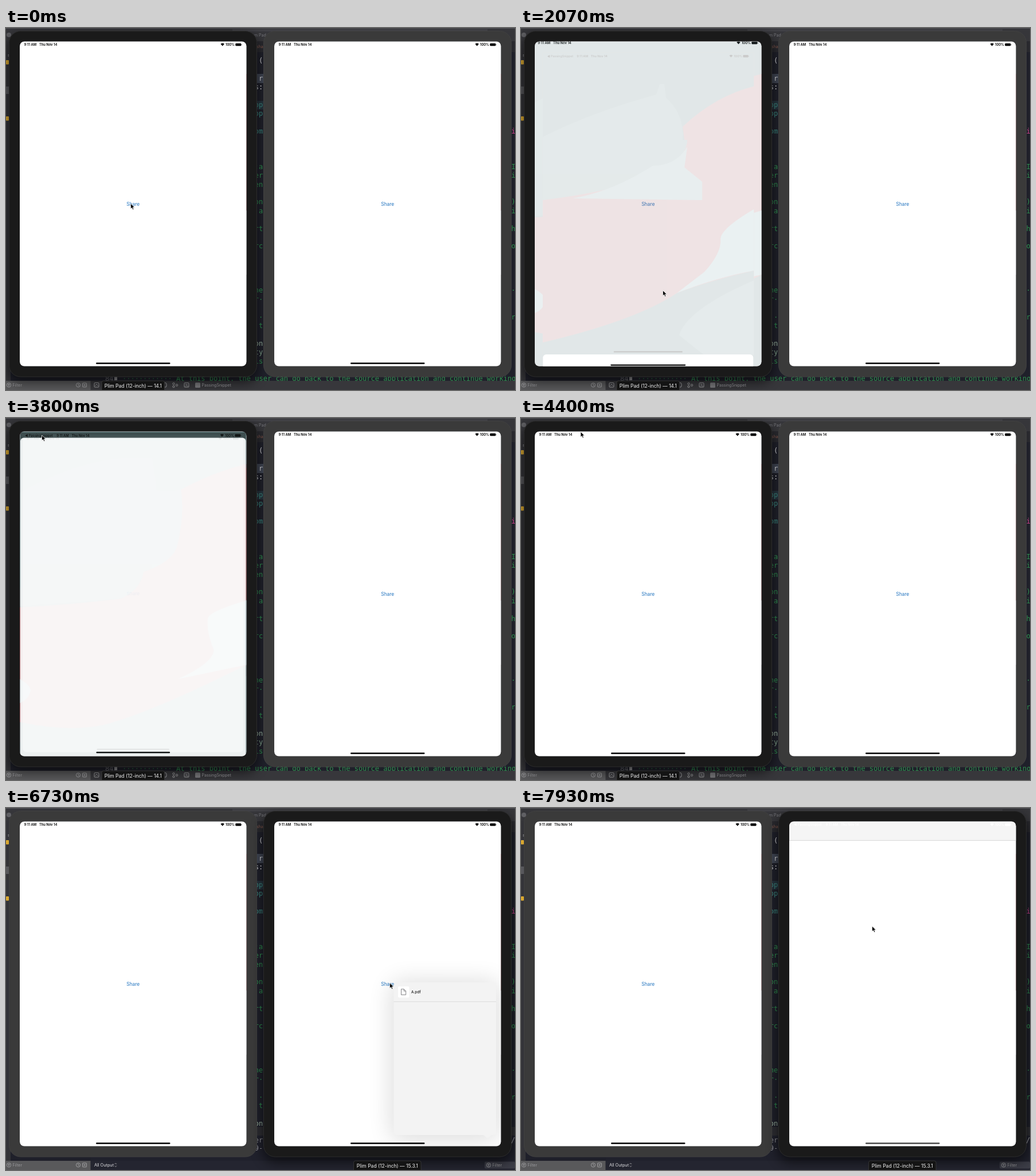
Recreate the animation shown at these times as an HTML page. Size 888 by 631 pixels, loop 8 s.

```html
<!DOCTYPE html>
<html lang="en">
<head>
<meta charset="utf-8">
<title>Sharing between two tablets</title>
<style>
html, body { margin: 0; width: 100%; height: 100%; overflow: hidden; background: #1f202a; }
svg { display: block; font-family: Inter, Roboto, sans-serif; }
.code { font: 12px "DejaVu Sans Mono", "Liberation Mono", monospace; white-space: pre; }
.soft { filter: blur(10px); }
.halo { filter: blur(20px); }
</style>
</head>
<body>
<svg id="stage" width="888" height="631" viewBox="0 0 888 631">
  <defs><clipPath id="screen"><rect width="395.5" height="566" rx="8"/></clipPath></defs>
</svg>
<script>
const LOOP = 8000, W = 395.5, H = 566;
const TEAL = '#6e8c8e', PINK = '#af787d', PALE = '#9bb9be';
const stage = document.getElementById('stage');

function put(parent, tag, attrs = {}, text = '') {
  const node = document.createElementNS('http://www.w3.org/2000/svg', tag);
  for (const key in attrs) node.setAttribute(key, attrs[key]);
  if (text) node.textContent = text;
  parent.append(node);
  return node;
}
const group = (parent, attrs) => put(parent, 'g', attrs);
const box = (parent, x, y, width, height, fill, rx = 0, more = {}) =>
  put(parent, 'rect', { x, y, width, height, fill, rx, ...more });
const label = (parent, x, y, size, fill, text, more = {}) =>
  put(parent, 'text', { x, y, 'font-size': size, fill, ...more }, text);
const shape = (parent, d, fill, more = {}) => put(parent, 'path', { d, fill, ...more });
const code = (parent, x, y, fill, text) => put(parent, 'text', { x, y, fill, class: 'code' }, text);

const clamp = v => Math.max(0, Math.min(1, v));
const span = (t, from, to) => clamp((t - from) / (to - from));
const ease = u => u * u * (3 - 2 * u);
const fade = (node, v) => node.setAttribute('opacity', v.toFixed(3));
const show = (node, on) => node.setAttribute('display', on ? 'inline' : 'none');
const zoom = (node, s) => node.setAttribute('transform',
  `translate(${W / 2} ${H / 2}) scale(${s}) translate(${-W / 2} ${-H / 2})`);

// Code editor behind the tablets
const lineY = n => 61 + n * 15.4;
function filterField(parent, x) {
  put(parent, 'circle', { cx: x, cy: 622.3, r: 3.7, fill: 'none', stroke: '#a5a5a8', 'stroke-width': .8 });
  shape(parent, `M${x - 2} 621h4M${x - 1.3} 622.5h2.6M${x - .6} 624h1.2`, 'none', { stroke: '#b5b5b8', 'stroke-width': .7 });
  label(parent, x + 6.5, 625, 7, '#98989b', 'Filter');
}
function drawEditor() {
  const g = group(stage);
  box(g, 0, 0, 888, 631, '#1f202a');
  box(g, 0, 0, 888, 23, '#36363a');
  box(g, 0, 0, 888, 1, '#55555a');
  box(g, 395, 2, 445, 4, '#404045');
  box(g, 0, 23, 888, 19, '#29292e');
  label(g, 433, 14.5, 7, '#77777b', 'm Pad');
  label(g, 437, 34.5, 7, '#85594c', 'sha');
  box(g, 0, 23, 8, 592, '#343438');
  put(g, 'circle', { cx: 5, cy: 12, r: 4, fill: '#606064' });
  label(g, 3, 50, 7, '#bbb', 's');
  box(g, 0, 102, 8, 13, '#57575b');
  for (const y of [56, 154]) box(g, 0, y, 5, 7.5, '#d9a72f', 1);
  box(g, 438, 80, 12, 16, '#3f4552');
  box(g, 438, 127, 12, 15, '#25323c');

  const GREEN = '#2f8f4e', AQUA = '#3c8a80', WHITE = '#d5d5d8';
  const snippets = [[0, ' (', WHITE], [2, ' r', WHITE], [3, 's:', WHITE], [5, 'op', AQUA], [6, 'op', AQUA],
    [8, 'om', AQUA], [12, ':a'], [13, 'er'], [14, 'en'], [16, 'on'], [17, ' a'], [19, 'rt'], [21, 'rc'],
    [26, 'he'], [27, 'r·'], [29, ' ·'], [30, ' t']];
  for (const [n, text, color = GREEN] of snippets) code(g, 433.8, lineY(n), color, text);
  const edge = [[8, 'i', '#d0408c'], [12, 'I'], [13, 'i'], [16, ')'], [17, 'i'], [19, 'h'], [21, 'o'], [26, '·'], [29, 'r']];
  for (const [n, text, color = GREEN] of edge) code(g, 881.5, lineY(n), color, text);
  code(g, 433.8, lineY(32), '#9fb8a4', 'on"');

  const plain = group(g);
  code(plain, 433.8, lineY(33), '#7f9f88', 'ty');
  code(plain, 433.8, lineY(34), GREEN, 'is');
  code(plain, 173, lineY(36), '#66666c', '84');
  box(plain, 189, 608, 5, 6, '#8a8a8e');
  code(plain, 203, lineY(36), '#2c6540', '·'.repeat(12));
  code(plain, 297, lineY(36), GREEN, 'At this point, the user can go back to the source application and continue working');
  box(plain, 0, 615, 888, 16, '#37373b');
  const line = { stroke: '#a5a5a8', 'stroke-width': .9 };
  box(plain, 154, 618.5, 8, 7.5, 'none', 1, line);
  shape(plain, 'M155.5 623.5l2.5-2.5 2.5 2.5', 'none', line);
  box(plain, 275, 618.5, 5, 7.5, 'none', 2, line);
  for (const [x, y] of [[292.5, 620], [292.5, 625], [298, 622.5]]) put(plain, 'circle', { cx: x, cy: y, r: 1.7, fill: 'none', ...line });
  box(plain, 311, 618.5, 8, 7.5, 'none', 1, line);
  shape(plain, 'M313 624.5l4-4M313 621h2M315.5 624h2', 'none', line);
  box(plain, 330, 618, 9, 9, '#77777a', 1.5);
  label(plain, 341.5, 625, 7, '#99999c', 'PassingSnippet');

  const console = group(g);
  box(console, 148, 556, 740, 75, '#20212c');
  box(console, 148, 556, 740, 15, '#2d2d32');
  code(console, 433.8, 583, '#8c8c92', 'er');
  code(console, 433.8, 597, '#8c8c92', '9-');
  code(console, 881, 583, '#a5a5a8', '/c');
  box(console, 148, 615, 740, 16, '#242530');
  label(console, 154, 625, 7.3, '#dedee0', 'All Output');
  shape(console, 'M189.5 621l1.8-2 1.8 2M189.5 623.5l1.8 2 1.8-2', 'none', { stroke: '#aaa', 'stroke-width': .8 });
  box(console, 835, 616.5, 53, 12, '#3c3d47', 2);
  filterField(console, 842);

  box(g, 0, 615, 147.5, 16, '#59595b');
  filterField(g, 5);
  put(g, 'circle', { cx: 126, cy: 622.3, r: 3.6, fill: 'none', ...line });
  shape(g, 'M126 620v2.5l1.8 1', 'none', line);
  box(g, 133.5, 618.8, 7, 7, 'none', 1, line);
  shape(g, 'M135 620.3l4 4m0-4l-4 4', 'none', line);
  return { plain, console };
}

// Parts of a tablet screen, in screen coordinates
function statusBar(parent, color, back) {
  const x = back ? 63.5 : 7.5, bold = { 'font-weight': 600 };
  if (back) label(parent, 8, 7.6, 5.7, color, '◀ PassingSnippet', { 'font-weight': 500 });
  label(parent, x, 7.6, 5.8, color, '9:11 AM', bold);
  label(parent, x + 26.4, 7.6, 5.8, color, 'Thu Nov 14', bold);
  shape(parent, 'M350.5 4.3Q353.7 1.9 356.9 4.3L353.7 7.9Z', color);
  label(parent, 359, 7.6, 5.8, color, '100%', bold);
  box(parent, 376.3, 3.3, 10, 4.5, color, 1.1);
  box(parent, 386.7, 4.8, .7, 1.6, color, .3);
}
const homeBar = (parent, color = '#000') => box(parent, 133, 559.7, 129.5, 2.6, color, 1.3);

function wallpaper(parent) {
  const g = group(parent, { transform: 'translate(-24 -23.5)' });
  box(g, 24, 23, 396, 567, PINK);
  shape(g, 'M24 23H420V80Q360 95 305 125Q312 170 298 225Q288 252 240 268Q234 300 200 315Q110 326 24 330Z', TEAL);
  shape(g, 'M24 130Q150 60 255 70Q262 110 262 126Q285 130 305 125Q312 170 298 225Q288 252 240 268Q234 300 200 315L24 328Z', '#78979a');
  shape(g, 'M420 318Q352 338 352 350Q350 375 363 405Q360 428 300 455L420 430Z', PALE);
  shape(g, 'M24 530Q110 548 170 535Q250 515 420 430V590H24Z', TEAL);
  shape(g, 'M24 455Q42 465 43 475Q40 490 24 497Z', PALE);
}

function mural(parent) {
  const g = group(parent, { transform: 'translate(197.75 283) scale(1.0787) translate(-221.7 -306.5)' });
  box(g, 38, 43, 368, 527, PINK);
  shape(g, 'M38 43H406V102Q340 118 282 172L286 205L240 240L38 296Z', TEAL);
  shape(g, 'M38 190Q120 148 236 116L242 98H250L253 122Q285 150 282 195H290Q290 225 240 255Q160 285 38 300Z', '#7b999b');
  shape(g, 'M290 207Q270 240 230 240Q160 285 90 297L316 300V268L285 243Z', '#8fadb1');
  shape(g, 'M406 316Q348 350 348 368Q350 392 320 425L272 462Q340 435 406 423Z', PALE);
  shape(g, 'M406 423Q330 440 272 462Q200 510 38 548V570H406Z', TEAL);
  shape(g, 'M406 440Q290 490 276 535Q300 555 320 570H406Z', '#7f9ea1');
}

function popover(parent) {
  const g = group(parent);
  box(g, 203, 278, 190, 278, '#000', 20, { class: 'halo', opacity: .13 });
  shape(g, 'M214.5 280.5H381q6 0 6 6V540.5q0 6-6 6h-1q-2 0-4 2.5-4 5-8 0-2-2.5-4-2.5H214.5q-6 0-6-6V286.5q0-6 6-6Z', '#f3f3f3');
  box(g, 208.5, 313.8, 178.5, .8, '#d6d6d6');
  box(g, 216, 287.5, 19.5, 19.5, '#fff', 2);
  shape(g, 'M221.5 292.2h4.7l3.4 3.4v6.6h-8.1ZM226.2 292.2v3.4h3.4', 'none', { stroke: '#77777a', 'stroke-width': .9 });
  label(g, 239, 299.7, 6.3, '#111', 'A.pdf', { 'font-weight': 500 });
  return g;
}

function tablet(x, hasSheet) {
  const shadow = box(stage, x - 2, 12, 437, 606, '#000', 24, { class: 'soft', opacity: .55 });
  const frame = box(stage, x + .5, 5.5, 432, 602.5, '#1a1a1a', 20, { stroke: '#2c2c2c' });
  const screen = group(group(stage, { transform: `translate(${x + 19} 23.5)` }), { 'clip-path': 'url(#screen)' });
  wallpaper(screen);

  const host = group(screen), guest = group(screen);
  box(host, 0, 0, W, H, '#fff', 8);
  statusBar(host, '#000');
  label(host, W / 2, 286, 8.4, '#2274bf', 'Share', { 'text-anchor': 'middle' });
  homeBar(host);

  let dim, sheet;
  if (hasSheet) {
    mural(guest);
    dim = box(guest, 0, 0, W, H, '#000');
    statusBar(guest, '#000', true);
    sheet = group(guest);
    box(sheet, 0, 0, W, H, '#fff', 6);
    homeBar(guest);
  } else {
    box(guest, 0, 0, W, H, '#fff', 8);
    box(guest, 0, 0, W, 33, '#f5f5f5');
    box(guest, 0, 32.7, W, .8, '#cfcfcf');
    statusBar(guest, '#fff', true);
    homeBar(guest, '#4a4a4a');
  }
  return { shadow, frame, screen, host, guest, dim, sheet, pop: popover(screen) };
}

function pill(x, width, text) {
  const g = group(stage);
  box(g, x, 615, width, 20, '#141414', 3, { stroke: '#3a3a3a', 'stroke-width': .8 });
  label(g, x + width / 2, 626.5, 8.5, '#f2f2f2', text, { 'text-anchor': 'middle' });
  return g;
}

const editor = drawEditor();
const left = tablet(5, true), right = tablet(449, false);
const leftPill = pill(167, 109.5, 'Plim Pad (12-inch) — 14.1');
const rightPill = pill(606.5, 117.5, 'Plim Pad (12-inch) — 15.3.1');
const cursor = shape(stage, 'M0 0V9.2L2.2 7.3 3.7 10.7 5.3 10 3.9 6.7H6.8Z', '#000', { stroke: '#fff', 'stroke-width': .7 });

// Time, x and y of the pointer's tip
const pointer = [[0, 217.5, 306], [1070, 217.5, 306], [1650, 247.5, 457.5], [2150, 247.5, 457.5],
  [2650, 113, 47.5], [2870, 113, 47.5], [3600, 62.5, 30], [3800, 62.5, 30], [4400, 104, 24], [4600, 104, 24],
  [4930, 640, 290], [5270, 640, 290], [5530, 669.5, 305], [6800, 669.5, 305], [7300, 700, 380],
  [7560, 700, 380], [7870, 612.5, 206], [LOOP, 612.5, 206]];

function setFocus(device, on) {
  show(device.shadow, on);
  device.frame.setAttribute('fill', on ? '#1a1a1a' : '#3a3a3a');
  device.frame.setAttribute('stroke', on ? '#2c2c2c' : '#414141');
}

// The host app grows and fades while the guest app rises beneath it.
function openGuest(device, u) {
  device.screen.insertBefore(device.guest, device.host);
  show(device.guest, u > 0);
  fade(device.guest, 1);
  fade(device.host, clamp(1 - 1.14 * u));
  zoom(device.host, 1 + .063 * u);
  zoom(device.guest, 1 - .088 * (1 - u));
}

function closeGuest(device, u) {
  device.screen.insertBefore(device.host, device.guest);
  show(device.guest, u < 1);
  fade(device.host, clamp(2.3 * u));
  fade(device.guest, 1 - u ** 1.2);
  zoom(device.host, .97 + .03 * u);
  zoom(device.guest, 1 - .03 * u);
}

function render(t) {
  const rightFocused = t >= 4930;
  setFocus(left, !rightFocused);
  setFocus(right, rightFocused);
  show(leftPill, !rightFocused);
  show(rightPill, rightFocused);
  show(editor.plain, t < 6000);
  show(editor.console, t >= 6000);

  if (t < 3730) openGuest(left, span(t, 2000, 2400));
  else closeGuest(left, span(t, 3730, 4130));
  const rise = ease(span(t, 2300, 2640));
  left.sheet.setAttribute('transform', `translate(0 ${H - (H - 9.5) * rise})`);
  fade(left.dim, .5 * rise);
  fade(left.pop, span(t, 270, 530) * (t >= 330) * (1 - span(t, 1780, 1900)));

  openGuest(right, span(t, 7560, 7900));
  fade(right.pop, (t >= 6730) * (1 - span(t, 7420, 7560)));

  const next = Math.max(1, pointer.findIndex(p => p[0] > t));
  const [t0, x0, y0] = pointer[next - 1], [t1, x1, y1] = pointer[next];
  const k = ease(span(t, t0, t1));
  cursor.setAttribute('transform', `translate(${x0 + (x1 - x0) * k} ${y0 + (y1 - y0) * k})`);
}

const start = performance.now();
function tick() {
  render((performance.now() - start) % LOOP);
  requestAnimationFrame(tick);
}
render(0);
requestAnimationFrame(tick);
</script>
</body>
</html>
```
